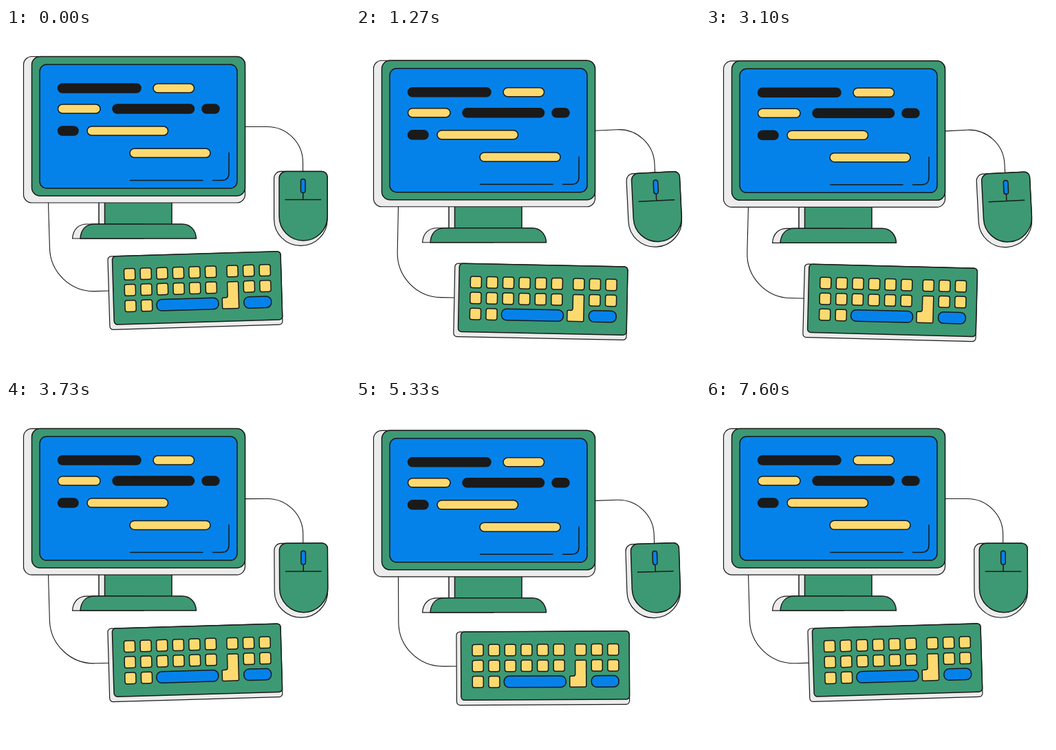
An HTML page with a canvas that plays this animation: 500 px wide and 500 px high, repeating every 7.66 s.

```html
<!DOCTYPE html>
<html lang="en">
<head>
<meta charset="utf-8">
<title>Desktop computer</title>
<style>
html, body { margin: 0; width: 100%; height: 100%; overflow: hidden; background: #fff; }
canvas { display: block; width: 500px; height: 500px; }
</style>
</head>
<body>
<canvas id="stage"></canvas>
<script>
const canvas = document.getElementById('stage');
const ctx = canvas.getContext('2d');
const dpr = window.devicePixelRatio || 1;
canvas.width = canvas.height = 500 * dpr;

const INK = '#1a1a1a', GREEN = '#3d9973', BLUE = '#0582ea';
const YELLOW = '#fdda70', PALE = '#ececec';
const LOOP = 7660, SWAY = 1920, DROP = 6.8, LAG = 120;
const rad = deg => deg * Math.PI / 180;

function paint(fill, width) {
  if (fill) {
    ctx.fillStyle = fill;
    ctx.fill();
  }
  ctx.lineWidth = width;
  ctx.strokeStyle = INK;
  ctx.stroke();
}

// Rounded box given by its edges
function box(x1, y1, x2, y2, r, fill, width = 1.5) {
  ctx.beginPath();
  ctx.roundRect(x1, y1, x2 - x1, y2 - y1, r);
  paint(fill, width);
}

function shape(path, fill, width = 1.5) {
  const p = new Path2D(path);
  if (fill) {
    ctx.fillStyle = fill;
    ctx.fill(p);
  }
  ctx.lineWidth = width;
  ctx.strokeStyle = INK;
  ctx.stroke(p);
}

function pivot(x, y, angle, draw) {
  ctx.save();
  ctx.translate(x, y);
  ctx.rotate(rad(angle));
  ctx.translate(-x, -y);
  draw();
  ctx.restore();
}

function drawMonitor() {
  // stand
  ctx.fillStyle = PALE;
  ctx.fillRect(135, 250, 10, 36);
  ctx.fillStyle = GREEN;
  ctx.fillRect(143.5, 250, 97.5, 36);
  shape('M135 250V286M143.5 250V286M241 250V286');
  shape('M96.5 306C97.5 293 105 285 118 285H200V306Z', PALE, 1.2);
  shape('M108 306C109 293 116 285 129 285H256C268 285 276 294 276.5 306Z', GREEN);

  // case
  box(25.5, 41.5, 347.5, 254, 12, PALE, 1.2);
  box(37.5, 41.5, 347.5, 244, 12, GREEN);
  box(49, 53, 336, 233, 10, BLUE);

  // lines of code
  const bar = (x1, x2, y, fill) => box(x1, y, x2, y + 13, 6.5, fill);
  bar(75.5, 196, 81, INK);
  bar(214, 273.5, 81, YELLOW);
  bar(75.5, 137, 111, YELLOW);
  bar(155, 273.5, 111, INK);
  bar(285, 310, 111, INK);
  bar(75.5, 105, 143, INK);
  bar(118, 235.5, 143, YELLOW);
  bar(180, 297, 175.3, YELLOW);
  shape('M180.5 221.5H286M300.5 221.5H313Q324 221.5 324 211V181.5');
}

function drawMouse() {
  shape('M347 143.5H379.5A52 52 0 0 1 431.5 195.5V209', null, 1.1);
  box(389.5, 208.5, 467, 316.5, [10, 8, 38.5, 38.5], PALE, 1.2);
  box(397, 208.5, 467, 309, [10, 8, 35, 35], GREEN);
  shape('M406 249.5H457.5M431.7 240V249.5');
  box(428.4, 219.5, 435, 239.5, 3.3, BLUE);
}

function drawKeyboard() {
  shape('M61.5 256V323.5A64.5 64.5 0 0 0 126 388H146', null, 1.1);
  box(145.5, 338, 396.7, 444.5, 5, PALE, 1.2);
  box(152, 338, 396.7, 437.3, 5, GREEN);

  const key = (x, y) => box(x, y, x + 16, y + 16.5, 3, YELLOW);
  const left = i => 168.5 + i * 23.6;
  for (let row = 0; row < 2; row++) {
    const y = 356.5 + row * 23;
    for (let i = 0; i < 6; i++) key(left(i), y);
    for (let i = row; i < 3; i++) key(318 + i * 23.6, y);
  }
  key(left(0), 402.7);
  key(left(1), 402.7);
  box(214.5, 402.7, 304.5, 419.2, 7.5, BLUE);
  box(341.5, 402.7, 381.3, 419.2, 7.5, BLUE);
  shape('M320 380H332Q334 380 334 382V417Q334 419 332 419H312Q310 419 310 417V405' +
        'Q310 403 312 403H315Q318 403 318 400V382Q318 380 320 380Z', YELLOW);
}

// Swings 0 -> 1 -> 0 with a soft ease at both ends
function swing(ms) {
  const u = ((ms % SWAY) + SWAY) % SWAY / (SWAY / 2);
  const p = u > 1 ? 2 - u : u;
  return p * p * p * (p * (6 * p - 15) + 10);
}

// Poses change five times in every 200 ms, with a longer first hold
function poseTime(ms) {
  const rest = ms % 200;
  const step = [70, 100, 130, 170].filter(at => rest >= at).length;
  return (Math.floor(ms / 200) * 5 + step) * 40;
}

function render(ms) {
  const t = poseTime(ms % LOOP);
  const main = swing(t), late = swing(t - LAG);
  const y = DROP * main;

  ctx.setTransform(dpr, 0, 0, dpr, 0, 0);
  ctx.fillStyle = '#fff';
  ctx.fillRect(0, 0, 500, 500);
  ctx.lineJoin = 'round';
  ctx.lineCap = 'round';

  ctx.translate(0, y);
  pivot(347, 143.5, -2.9 * late, drawMouse);
  ctx.save();
  ctx.translate(0, -DROP / 2);
  pivot(61.5, 257.4, -1.7 + 3.35 * main, drawKeyboard);
  ctx.restore();
  drawMonitor();
}

const start = performance.now();
function tick() {
  render(performance.now() - start);
  requestAnimationFrame(tick);
}
tick();
</script>
</body>
</html>
```
